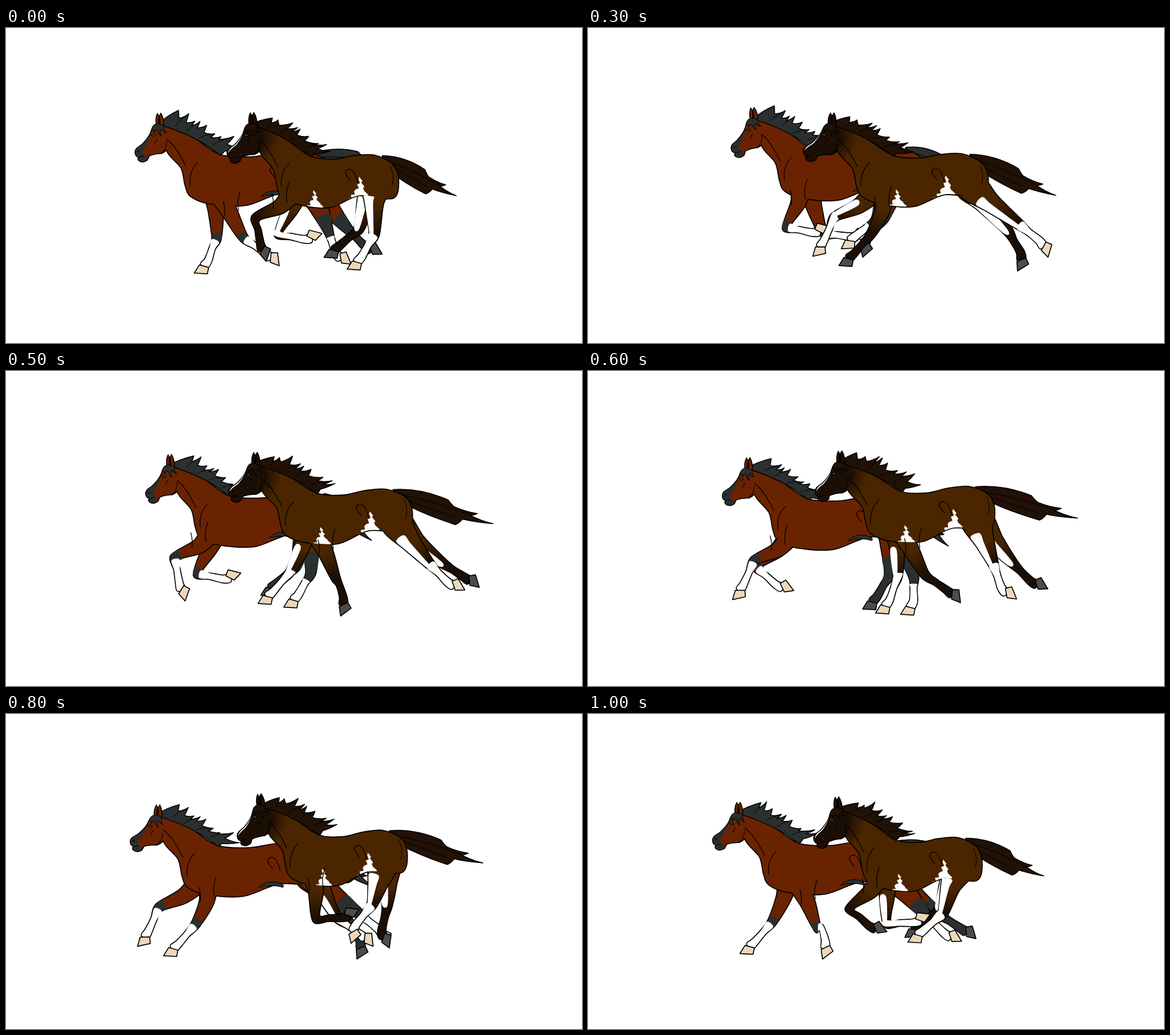
An HTML page that plays this animation: 1011 px wide and 554 px high, repeating every 1.1 s.

```html
<!DOCTYPE html>
<html lang="en">
<head>
<meta charset="utf-8">
<title>Two horses galloping</title>
<style>
  html, body { margin: 0; width: 100%; height: 100%; overflow: hidden; background: #fff; }
  svg { display: block; width: 100%; height: 100%; }
</style>
</head>
<body>
<svg id="stage" viewBox="0 0 1011 554" stroke-linejoin="round" stroke-linecap="round"></svg>
<script>
const STEPS = 11, STEP_MS = 100, TAU = Math.PI * 2, GROUND = 431;
const RED = '#6a2300', SLATE = '#2a2f2f', BROWN = '#4a2500', SOOT = '#1b0e04', DARK = '#211106',
      WHITE = '#fff', TAN = '#ecd8b8', GREY = '#4c4c4e';

// Both horses share one gallop; shift is the phase in steps.
const bay = { shift: 6, x: -159, y: 3, stretch: 1.25, reach: 0, drift: [16, 9.6],
              bob: [9, 9, 3.3], tail: [125, 25, 20], hair: SLATE, seed: 3 };
const pinto = { shift: 0, x: 0, y: 0, stretch: 1, reach: 12, drift: [12, 7.7],
                bob: [5, 14, 1.3], tail: [158, 21, 6], hair: DARK, seed: 8 };

// Torso from the poll along the back, round the rump and belly to the throat.
const POLL = 0, NECK = 1, WITHERS = 2, CROUP = 5, RUMP = 6, BUTT = 7, FLANK = 9,
      BREAST = 13, BASE = 14, THROAT = 15;
const TORSO = [[448, 169], [493, 189], [541, 220], [585, 224], [621, 217], [657, 215], [690, 230], [701, 257],
  [691, 289], [629, 286], [577, 308], [522, 305], [490, 292], [481, 273], [474, 243], [449, 212]];
const BELLY_SPOT = [[549, 280], [533, 313], [568, 312]];
const THIGH_SPOT = [[632, 254], [611, 293], [658, 300]];

const wave = (s, mean, amp, peak) => mean + amp * Math.cos(TAU * (s - peak) / STEPS);
const rand = n => { const v = Math.sin(n * 127.1) * 43758.5; return v - Math.floor(v); };
const mix = (a, b, t) => a.map((v, i) => v + (b[i] - v) * t);
const add = (p, x, y) => [p[0] + x, p[1] + y];
// Angles hang from straight down, positive towards the head.
const polar = (p, len, deg) => add(p, -len * Math.sin(deg * TAU / 360), len * Math.cos(deg * TAU / 360));

const xy = p => p[0].toFixed(1) + ' ' + p[1].toFixed(1);
const poly = p => 'M' + p.map(xy).join('L') + 'Z';
const path = (d, fill, line = 0) =>
  `<path d="${d}" fill="${fill}"${line ? ` stroke="#000" stroke-width="${line}"` : ''}/>`;
const arc = (a, c, b, w = 1.3) => path(`M${xy(a)}Q${xy(c)} ${xy(b)}`, 'none', w);
const place = ([x, y, r], size, inner) =>
  `<g transform="translate(${x} ${y}) rotate(${r}) scale(${size})">${inner}</g>`;

// Carries a torso point along with the body's drift, bob and stretch.
function carry(h, s, [x, y]) {
  const u = Math.max(0, (x - 448) / 253), w = TORSO[WITHERS][0];
  const long = x > w ? w + (x - w) * h.stretch : x;
  return [
    long + h.x + wave(s, 0, h.drift[0] * (1 - .35 * u), h.drift[1]) + wave(s, 0, h.reach * u, 4.5),
    y + h.y + wave(s, 0, h.bob[0] + (h.bob[1] - h.bob[0]) * u, h.bob[2])
  ];
}

function chain(hip, stifle, upperLen, lowerLen, upper, lower, bend) {
  const knee = polar(stifle, upperLen, upper), fetlock = polar(knee, lowerLen, lower);
  const point = Math.min(lower + bend, 54);
  const coronet = polar(fetlock, 13, (lower + point) / 2), toe = polar(coronet, 21, point);
  const lift = Math.max(0, toe[1] - GROUND);
  return [hip, stifle, knee, mix(knee, fetlock, .5), fetlock, coronet, toe]
    .map((p, i) => i > 2 ? add(p, 0, -lift) : p);
}

function foreleg(withers, s, far) {
  const t = s - (far ? 2 : 0), c = wave(t, 0, 1, .3);
  const elbow = add(withers, (far ? -26 : -17) - 37 * c, 97 - 9 * c);
  return chain(add(withers, -18 - 14 * c, 62), elbow, 46, 45,
    wave(t, 19, 48, .5), wave(t, -23, 68, 2.4), wave(t, 5, 42, 3.4));
}

function hindleg(croup, s, far) {
  const t = s - (far ? 1 : 0), c = wave(t, 0, 1, 9.2);
  const stifle = add(croup, 19 - 37 * c, wave(s, 91, -8, 1.2));
  return chain(add(croup, 8 - 8 * c, 54), stifle, wave(t, 48, 14, 2), 45,
    wave(t, -16, 38, 9), wave(t, -2, 55, 9.3), wave(t, 5, 50, 1.1));
}

function poseAt(h, step) {
  const s = step + h.shift, body = TORSO.map(p => carry(h, s, p));
  return {
    s, body,
    head: [...add(body[POLL], -23, 16), wave(s, -5, 5, 3)],
    foreNear: foreleg(body[WITHERS], s), foreFar: foreleg(body[WITHERS], s, true),
    hindNear: hindleg(body[CROUP], s), hindFar: hindleg(body[CROUP], s, true)
  };
}

// Smooth closed curve through points.
function curve(p) {
  const n = p.length, at = i => p[(i + n) % n];
  let d = 'M' + xy(p[0]);
  for (let i = 0; i < n; i++) {
    const a = at(i - 1), b = at(i), c = at(i + 1), e = at(i + 2);
    d += `C${xy(add(b, (c[0] - a[0]) / 6.5, (c[1] - a[1]) / 6.5))} ` +
         `${xy(add(c, (b[0] - e[0]) / 6.5, (b[1] - e[1]) / 6.5))} ${xy(c)}`;
  }
  return d + 'Z';
}

// Tapered limb from [x, y, radius] joints; back scales the rear half.
function limb(joints, back = 1) {
  const front = [], rear = [];
  const unit = (a, b) => {
    const l = Math.hypot(b[0] - a[0], b[1] - a[1]) || 1;
    return [(b[0] - a[0]) / l, (b[1] - a[1]) / l];
  };
  joints.forEach((p, i) => {
    const u = unit(joints[i - 1] || p, p), v = unit(p, joints[i + 1] || p);
    const [x, y] = unit([0, 0], [u[0] + v[0], u[1] + v[1]]);
    front.push(add(p, -y * p[2], x * p[2]));
    rear.unshift(add(p, y * p[2] * back, -x * p[2] * back));
  });
  return curve(front.concat(rear));
}

function cut(joints, from, to) {
  const at = t => {
    const i = Math.min(Math.floor(t), joints.length - 2);
    return mix(joints[i], joints[i + 1], t - i);
  };
  return [at(from), ...joints.filter((_, i) => i > from && i < to), at(to)];
}

function hoof(c, toe) {
  const x = (toe[0] - c[0]) / 20, y = (toe[1] - c[1]) / 20;
  return poly([[5, -6], [20, 0], [3, 14], [-5, 6.5]].map(([u, v]) => add(c, x * u + y * v, y * u - x * v)));
}

const FORE = [15, 12.5, 7.5, 5, 6, 6.5], HIND = [24, 16, 8.5, 5.5, 6.5, 6.5];

// Coats are [from, to, colour, back] slices along the limb.
function leg(points, radii, hoofColour, coats) {
  const joints = radii.map((r, i) => [...points[i], r]);
  return {
    outline: limb(joints),
    fill: coats.map(([a, b, c, back]) => path(limb(cut(joints, a, b), back), c)).join(''),
    hoof: path(hoof(points[5], points[6]), hoofColour, 1.7)
  };
}
const drawLeg = l => path(l.outline, 'none', 3.4) + l.fill + l.hoof;

// Strands of hair: out to every tip, back to a notch between tips.
function hair(start, out, tips, notch, back, end, colour) {
  let d = `M${xy(start)}Q${xy(out)} ${xy(tips[0])}`;
  for (let i = 1; i < tips.length; i++) {
    const gap = notch(mix(tips[i - 1], tips[i], .5), i / tips.length);
    d += `Q${xy(add(mix(tips[i - 1], gap, .6), 0, 2))} ${xy(gap)}` +
         `Q${xy(add(mix(gap, tips[i], .5), 0, 3))} ${xy(tips[i])}`;
  }
  return path(d + `Q${xy(back)} ${xy(end)}Z`, colour, 1.5);
}

function tail(h, { s, body }) {
  const [len, droop, swing] = h.tail, root = mix(body[CROUP], body[RUMP], .6);
  const a = wave(s, droop, swing, 1) * TAU / 360, l = wave(s, len, len * .12, 5.8);
  const at = (u, v) => add(root, l * u * Math.cos(a) - v * Math.sin(a), l * u * Math.sin(a) + v * Math.cos(a));
  const tips = [at(.5, -17), at(.82, -9), at(1, 0), at(.64, 21)], heart = at(.4, 2);
  return hair(at(-.06, -6), at(.2, -23), tips, p => mix(p, heart, .3), at(.28, 20), at(0, 9), h.hair) +
    arc(at(0, 0), at(.3, -8), at(.75, -3), 1) + arc(at(0, 4), at(.25, 6), at(.62, 9), 1);
}

function mane(h, { s, body }) {
  const [poll, neck, withers] = body, start = add(poll, -15, -3), count = 9;
  const crest = t => t < .5 ? mix(poll, neck, t * 2) : mix(neck, withers, t * 2 - 1);
  const tips = Array.from({ length: count }, (_, i) => {
    const u = i / (count - 1), rise = wave(s, 43 - 32 * u, 9, 7) + 7 * Math.sin(i * 1.9 + s * 2.3);
    return polar(crest(u * .92 + .03), 30 + 10 * u + 16 * (rand(i + h.seed) - .5), -90 - rise);
  });
  const strands = [1, 3, 5, 7].map(i => {
    const root = crest(i / count);
    return arc(mix(root, tips[i], .2), add(mix(root, tips[i], .5), 0, -3), mix(root, tips[i], .8), 1);
  });
  return hair(start, add(mix(start, tips[0], .5), -2, -3), [...tips, withers],
    (p, t) => mix(p, crest(t), .38), mix(mix(start, withers, .5), neck, 2), start, h.hair) + strands.join('');
}

const SKULL = 'M26 -19L4 -16Q-2 -9 -5 -2Q-10 6 -21 15Q-28 19 -31 21Q-35 25 -34 29Q-34 34 -28 36' +
  'Q-32 39 -29 42Q-23 47 -15 42Q-13 38 -11 35Q0 32 11 33Q18 31 23 25L32 6Z';
const EARS = 'M7 -17Q6 -29 11 -37Q16 -28 13 -17ZM12 -16Q11 -30 17 -37Q22 -27 20 -14Z';
const FORELOCK = 'M14 -18Q2 -23 -3 -8Q1 -13 2 -4Q5 -11 9 -7Q9 -1 14 3Q11 -6 15 -9Q18 -4 23 -2Q18 -8 20 -15Z';
const MUZZLE = 'M-5 -2Q-10 6 -21 15Q-35 20 -34 29Q-34 34 -28 36Q-32 39 -29 42Q-23 47 -15 42L-14 37Q-22 34 -22 27Q-16 20 -10 10Z';
const BLAZE = 'M-3 -7Q-10 6 -21 15Q-32 20 -33 27L-30 23Q-24 18 -19 15.5Q-10 7 -3 -7Z';

function face(coat, hairColour, mark) {
  return mark + path(EARS, coat, 1.5) + path(FORELOCK, hairColour, 1) +
    path('M-4 0Q0 -4 4 1Q0 3 -4 0Z', '#256b4c', 1.2) +
    path('M-31 27Q-28 23 -27 27M-28 36L-20 35M11 33Q21 28 22 13M6 8L1 15', 'none', 1.1);
}

// Muscle lines on neck, shoulder and flank.
function contours({ body, foreNear }) {
  const elbow = foreNear[1], base = body[BASE], breast = body[BREAST];
  const s = mix(base, body[WITHERS], .42);
  return arc(mix(body[POLL], body[THROAT], .55), mix(body[THROAT], body[NECK], .35), mix(base, body[WITHERS], .12)) +
    arc(s, mix(mix(s, breast, .5), base, .3), mix(breast, body[FLANK], .05)) +
    arc(add(elbow, 16, -42), add(elbow, 9, -24), add(elbow, 13, -8)) +
    arc(add(elbow, -14, -24), add(elbow, -10, -10), add(elbow, -12, 2)) +
    path(`M${xy(add(body[FLANK], -14, -26))}q-16 -16 -3 -20q10 -1 16 24`, 'none', 1.3) +
    arc(add(body[BUTT], -14, -24), add(body[BUTT], -6, -8), add(body[BUTT], -11, 10), 1);
}

// Torso, head and near legs share one silhouette.
function trunk(pose, size, coat, headCoat, near) {
  const shape = curve(pose.body);
  return near.map(l => path(l.outline, 'none', 3.4)).join('') + path(shape, 'none', 3.4) +
    place(pose.head, size, path(SKULL, 'none', 3.2)) + near.map(l => l.fill).join('') +
    path(shape, coat) + place(pose.head, size, path(SKULL, headCoat)) + near.map(l => l.hoof).join('');
}

function drawBay(p) {
  const sock = [[0, 5, RED], [1.8, 5, SLATE], [2.2, 5, WHITE]];
  const foreNear = leg(p.foreNear, FORE, TAN, sock), foreFar = leg(p.foreFar, FORE, TAN, sock);
  const hindNear = leg(p.hindNear, HIND, TAN, [[0, 5, RED], [1.4, 5, SLATE], [2.7, 5, WHITE]]);
  const hindFar = leg(p.hindFar, HIND, GREY, [[0, 5, RED], [1.5, 5, SLATE]]);
  const [fx, fy] = p.body[FLANK];
  return tail(bay, p) + drawLeg(hindFar) + drawLeg(foreFar) + trunk(p, 1, RED, RED, [hindNear, foreNear]) +
    path(`M${fx - 38} ${fy + 7}q12 -13 32 -9q14 4 10 9q-20 -6 -42 0Z`, SLATE, 1) +
    contours(p) + mane(bay, p) + place(p.head, 1, face(RED, SLATE, path(MUZZLE, SLATE)));
}

// White marking with ragged, slightly hollow flanks.
function spot([apex, left, right]) {
  const hub = mix(mix(left, right, .5), apex, .35);
  const ragged = (a, b) => [0, 1, 2, 3, 4].map(i => add(mix(a, b, i / 5), i % 2 ? 2 : -2, i % 2 ? 1.5 : -1));
  const l = mix(mix(left, apex, .5), hub, .35), r = mix(mix(right, apex, .5), hub, .35);
  return path(poly([...ragged(left, l), ...ragged(l, apex), ...ragged(apex, r), ...ragged(r, right), right]), WHITE);
}

function drawPinto(p) {
  const legs = ['foreNear', 'foreFar', 'hindNear', 'hindFar'];
  const stops = (a, from, to) => `<stop offset="${a}" stop-color="${from}"/><stop offset="1" stop-color="${to}"/>`;
  const fade = id => {
    const [, a, b] = p[id];
    return `<linearGradient id="${id}" gradientUnits="userSpaceOnUse" x1="${a[0]}" y1="${a[1]}" ` +
      `x2="${b[0]}" y2="${b[1]}">${stops(0, BROWN, SOOT)}</linearGradient>`;
  };
  const defs = `<defs>${legs.map(fade).join('')}<radialGradient id="hide" gradientUnits="userSpaceOnUse" ` +
    `cx="${p.head[0] + 8}" cy="${p.head[1] + 4}" r="50">${stops(.4, SOOT, BROWN)}</radialGradient>` +
    `<clipPath id="torso"><path d="${curve(p.body)}"/></clipPath></defs>`;
  const coat = id => [0, 5, `url(#${id})`];
  const foreNear = leg(p.foreNear, FORE, GREY, [coat('foreNear')]);
  const foreFar = leg(p.foreFar, FORE, TAN, [coat('foreFar'), [1, 2, WHITE, -.1], [1.9, 5, WHITE]]);
  const hindNear = leg(p.hindNear, HIND, TAN, [coat('hindNear'), [.6, 2.2, WHITE, -.1], [2.1, 5, WHITE]]);
  const hindFar = leg(p.hindFar, HIND, GREY, [coat('hindFar'), [.6, 2, WHITE, .1]]);
  const spots = [BELLY_SPOT, THIGH_SPOT].map(t => spot(t.map(q => carry(pinto, p.s, q)))).join('');
  return defs + tail(pinto, p) + drawLeg(hindFar) + drawLeg(foreFar) +
    trunk(p, 1.04, 'url(#hide)', SOOT, [hindNear, foreNear]) +
    `<g clip-path="url(#torso)">${spots}</g>` + contours(p) + mane(pinto, p) +
    place(p.head, 1.04, face(SOOT, DARK, path(BLAZE, WHITE)));
}

const stage = document.getElementById('stage');
let shown = -1;
function draw(ms) {
  const step = Math.floor(ms / STEP_MS) % STEPS;
  if (step === shown) return;
  shown = step;
  stage.innerHTML = drawBay(poseAt(bay, step)) + drawPinto(poseAt(pinto, step));
}

const begin = performance.now();
function tick() {
  draw(performance.now() - begin);
  requestAnimationFrame(tick);
}
tick();
</script>
</body>
</html>
```
